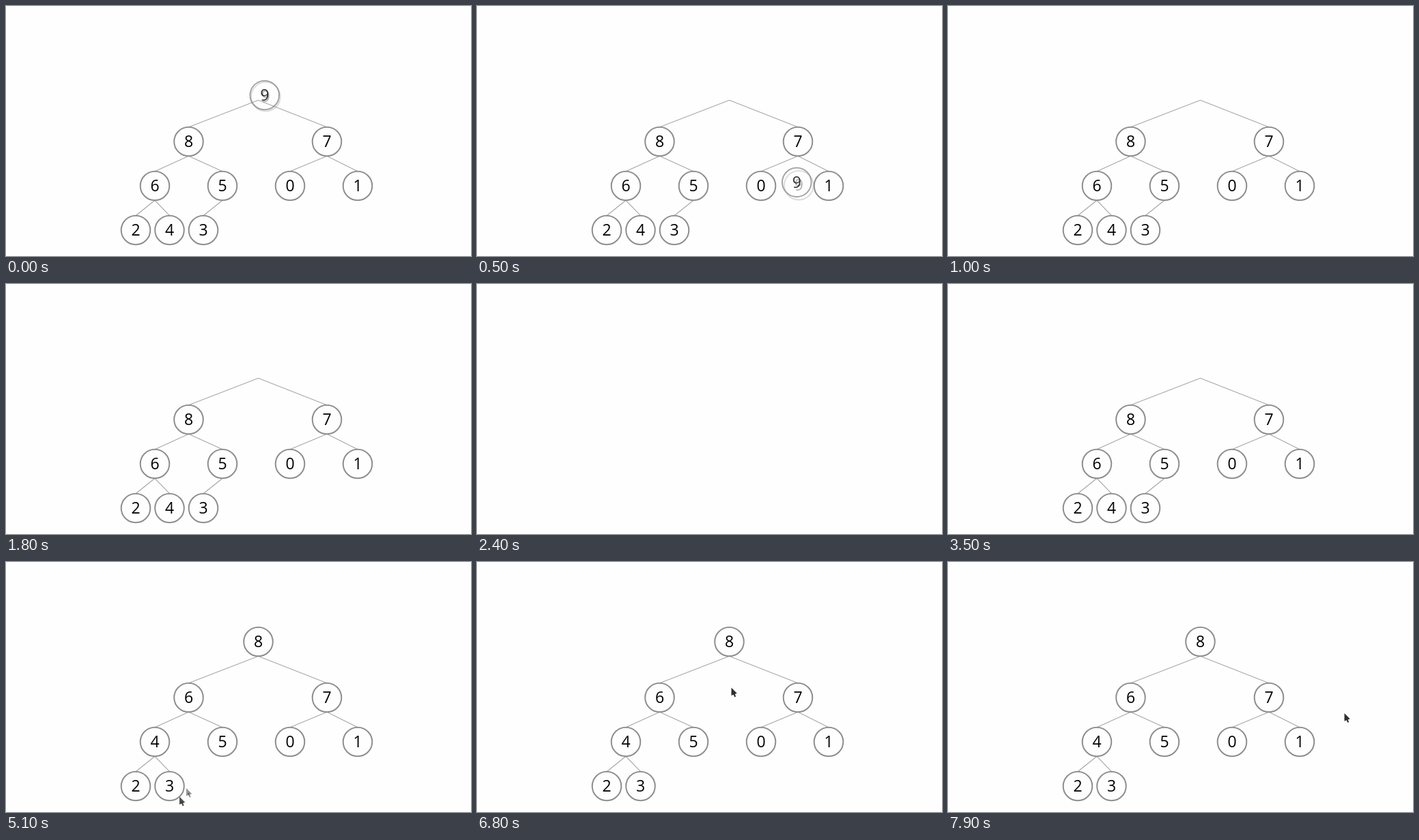
An HTML page with a canvas that plays this animation: 681 px wide and 367 px high, repeating every 8 s.

```html
<!DOCTYPE html>
<html lang="en">
<head>
<meta charset="utf-8">
<title>Heap: remove the maximum</title>
<style>
html, body { margin: 0; width: 100%; height: 100%; overflow: hidden; background: #fefefe; }
canvas { display: block; }
</style>
</head>
<body>
<canvas id="stage" width="681" height="367"></canvas>
<script>
const ctx = document.getElementById('stage').getContext('2d');
const LOOP = 8000, STEP = 100, R = 21.3;

// Labels in level order; the parent of i is (i - 1) >> 1.
const before = ' 876501243', after = '867450123';

// First x and spacing of each level
const left = [369.5, 267.5, 218, 190], gap = [0, 202.5, 99, 49.5];

// Corners of the pointer's route
const route = [[372.5, 184.5], [298, 112], [403, 112], [502, 170], [580.5, 222]];

const mix = (a, b, k) => a + (b - a) * k;

function place(i) {
  const level = Math.floor(Math.log2(i + 1)), k = i + 1 - 2 ** level;
  return [left[level] + gap[level] * k, level ? 134 + 65 * level : 117];
}

function node(x, y, label) {
  ctx.strokeStyle = '#8e8e8e';
  ctx.lineWidth = 2;
  ctx.beginPath();
  ctx.arc(x, y, R, 0, 7);
  ctx.stroke();
  ctx.fillStyle = '#000';
  ctx.fillText(label, x, y + 8);
}

function tree(labels) {
  ctx.strokeStyle = '#a8a8a8';
  ctx.lineWidth = 1.2;
  ctx.beginPath();
  for (let i = 1; i < labels.length; i++) {
    const [px, py] = place((i - 1) >> 1), [x, y] = place(i);
    ctx.moveTo(px, py + R);
    ctx.lineTo(x, y - R);
  }
  ctx.stroke();
  [...labels].forEach((label, i) => {
    if (label !== ' ') node(...place(i), label);
  });
}

function leavingNode(t, alpha) {
  const k = (1 - Math.cos(Math.PI * (t + 190) / 1200)) / 2;
  ctx.globalAlpha = alpha;
  node(mix(369, 530, k), mix(117, 347, k), '9');
}

function pointer(x, y, alpha = 1) {
  ctx.globalAlpha = alpha;
  ctx.fillStyle = ctx.strokeStyle = '#303030';
  ctx.lineWidth = 2.2;
  ctx.beginPath();
  ctx.moveTo(x, y);
  ctx.lineTo(x, y + 11.5);
  ctx.lineTo(x + 8.2, y + 8.3);
  ctx.fill();
  ctx.beginPath();
  ctx.moveTo(x + 3, y + 7);
  ctx.lineTo(x + 5.7, y + 13.4);
  ctx.stroke();
}

function movePointer(t) {
  const rest = t >= 7700 ? STEP : 0;
  const u = (t - rest - 6800) / 250, i = Math.min(3, Math.floor(u));
  const [x0, y0] = route[i], [x1, y1] = route[i + 1];
  pointer(mix(x0, x1, u - i), mix(y0, y1, u - i));
}

function draw(t) {
  ctx.globalAlpha = 1;
  ctx.fillStyle = '#fefefe';
  ctx.fillRect(0, 0, 681, 367);
  if (t >= 2400 && t < 3200) return;

  ctx.font = '23px "Open Sans", "Noto Sans", sans-serif';
  ctx.textAlign = 'center';
  if (t < 5100) {
    if (t >= 3200) ctx.globalAlpha = Math.min(1, (t - 3100) / 400);
    tree(before);
    if (t < 1000) {
      leavingNode(t, 0.8);
      leavingNode(t + 15, 0.3);
    }
  } else {
    tree(after);
    if (t < 6800) {
      pointer(264, 332, 0.5);
      pointer(254, 344.5, 0.85);
    } else movePointer(t);
  }
}

const start = performance.now();
function tick() {
  const t = (performance.now() - start) % LOOP;
  draw(Math.floor(t / STEP) * STEP);
  requestAnimationFrame(tick);
}
tick();
</script>
</body>
</html>
```
